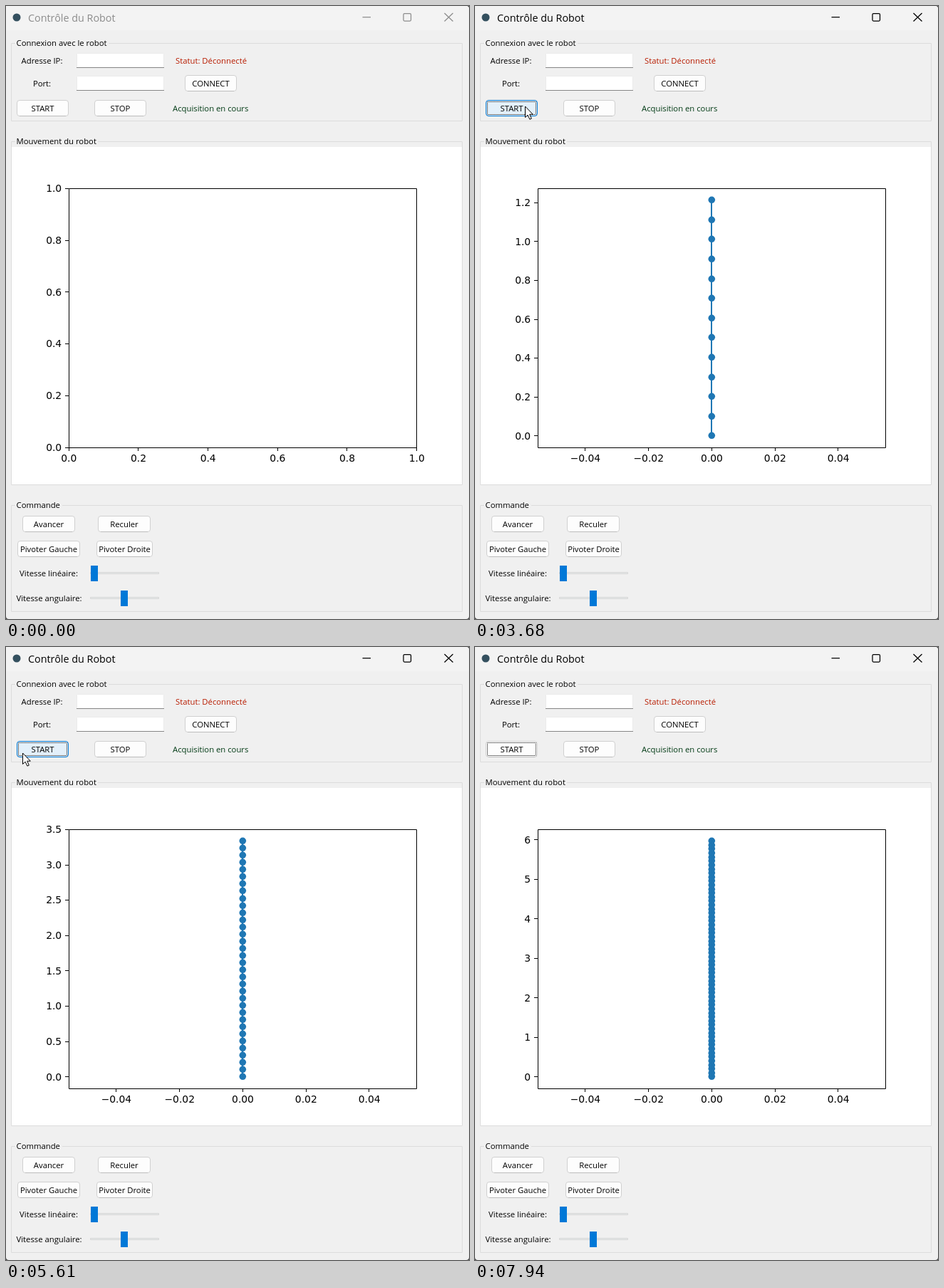
An HTML page with a canvas for the animation above (8 s loop, 650 px wide and 861 px high).

```html
<!DOCTYPE html>
<html lang="fr">
<head>
<meta charset="utf-8">
<title>Contrôle du Robot</title>
<style>
html, body { margin: 0; width: 100%; height: 100%; overflow: hidden; background: #f0f0f0; }
canvas { display: block; }
</style>
</head>
<body>
<canvas id="stage" width="650" height="861"></canvas>
<script>
const ctx = document.getElementById('stage').getContext('2d');
const LOOP = 8000, TICK = 66.5;
const UI = '11.3px "Open Sans", sans-serif';
const PLOT_FONT = '13.89px "DejaVu Sans", sans-serif';
const AX = { left: 88.1, right: 576.5, top: 256.2, bottom: 620.4 };
const STEP = 0.1011; // distance between two robot positions

// [time, index of the newest point]
const progress = [
  [2570, 0], [2960, 4], [3129, 4], [3130, 6], [3540, 11], [3680, 12], [4480, 21],
  [4610, 22], [5350, 31], [5480, 32], [5610, 33], [5750, 35], [5939, 35], [5940, 37],
  [6610, 45], [6750, 46], [6880, 47], [7010, 47], [7540, 55], [7940, 59]
];

function rect(x, y, w, h, fill, stroke, radius = 0) {
  ctx.beginPath();
  ctx.roundRect(x, y, w, h, radius);
  if (fill) { ctx.fillStyle = fill; ctx.fill(); }
  if (stroke) { ctx.strokeStyle = stroke; ctx.stroke(); }
}

function line(color, ...points) {
  ctx.beginPath();
  for (const [x, y] of points) ctx.lineTo(x, y);
  ctx.strokeStyle = color;
  ctx.stroke();
}

function text(str, x, y, { color = '#000', align = 'left', font = UI } = {}) {
  ctx.font = font;
  ctx.textAlign = align;
  ctx.fillStyle = color;
  ctx.fillText(str, x, y);
}

const centered = (str, x, y) => text(str, x, y, { align: 'center' });

function dot(x, y, r, color) {
  ctx.beginPath();
  ctx.arc(x, y, r, 0, 2 * Math.PI);
  ctx.fillStyle = color;
  ctx.fill();
}

function group(label, top, bottom, labelWidth) {
  rect(7.5, top + 0.5, 633, bottom - top, null, '#dcdcdc');
  rect(13, top - 2, labelWidth, 6, '#f0f0f0');
  text(label, 14.5, top + 4);
}

function button(label, x, y, w, fill = '#fdfdfd', border = '#d0d0d0', base = '#bcbcbc') {
  rect(x + 0.5, y + 0.5, w - 1, 22, fill, border, 3.5);
  line(base, [x + 4, y + 22.5], [x + w - 4, y + 22.5]);
  centered(label, x + w / 2, y + 15.5);
}

function entry(y) {
  rect(99.5, y + 0.5, 122, 20, '#fff', '#ebebeb', 1);
  line('#868686', [99, y + 20.5], [222, y + 20.5]);
}

function slider(y, thumbX) {
  rect(118.5, y - 1.5, 96, 2, '#e7eaea', '#d6d6d6');
  rect(thumbX, y - 11, 10, 22, '#0078d7');
}

function titleBar(active) {
  const ink = active ? '#000' : '#8c8c8c';
  rect(0, 0, 650, 34, '#f3f3f3', null, [0, 4, 0, 0]);
  dot(15, 16, 5.5, '#34505f');
  text('Contrôle du Robot', 31, 21.5, { color: ink, font: '14.35px "Open Sans", sans-serif' });
  ctx.lineWidth = 1.25;
  line(ink, [500.5, 15.7], [512, 15.7]);
  rect(558, 10.5, 10.5, 10.5, null, ink, 1.5);
  line(ink, [615.5, 10], [627.5, 21.5]);
  line(ink, [627.5, 10], [615.5, 21.5]);
  ctx.lineWidth = 1;
}

function newestPoint(t) {
  if (t < progress[0][0]) return -1;
  const i = progress.findIndex(p => p[0] > t);
  if (i < 0) return progress.at(-1)[1];
  const [t0, n0] = progress[i - 1], [t1, n1] = progress[i];
  const frames = Math.max(1, Math.round((t1 - t0) / TICK));
  const frame = Math.floor((t - t0) / (t1 - t0) * frames + 1e-6);
  return Math.floor(n0 + (n1 - n0) * frame / frames + 0.4);
}

function niceStep(range) {
  const raw = range / 9, base = 10 ** Math.floor(Math.log10(raw));
  return base * [1, 2, 2.5, 5, 10].find(s => s * base >= raw - 1e-9);
}

function ticks(lo, hi, step, draw) {
  const digits = [0, 1, 2, 3].find(d => Math.abs(step * 10 ** d - Math.round(step * 10 ** d)) < 1e-6);
  for (let i = Math.ceil(lo / step - 1e-6); i * step <= hi + 1e-6; i++)
    draw((i * step - lo) / (hi - lo), (i * step).toFixed(digits).replace('-', '\u2212'));
}

function plot(n) {
  const { left, right, top, bottom } = AX;
  const snap = v => Math.floor(v) + 0.5;
  const max = n * STEP;
  const [xLo, xHi, xStep] = n < 0 ? [0, 1, 0.2] : [-0.055, 0.055, 0.02];
  const [yLo, yHi] = n < 0 ? [0, 1] : n ? [-0.05 * max, 1.05 * max] : [-0.055, 0.055];
  const yStep = n < 0 ? 0.2 : niceStep(yHi - yLo);
  const toY = v => bottom - (v - yLo) / (yHi - yLo) * (bottom - top);

  rect(8, 198, 632, 474, '#fff');
  ticks(xLo, xHi, xStep, (f, label) => {
    const x = left + f * (right - left);
    line('#000', [snap(x), 620], [snap(x), 625]);
    text(label, x + 0.2, 640.3, { align: 'center', font: PLOT_FONT });
  });
  ticks(yLo, yHi, yStep, (f, label) => {
    const y = bottom - f * (bottom - top);
    line('#000', [83, snap(y)], [88, snap(y)]);
    text(label, 78.2, Math.round(y + 4.7), { align: 'right', font: PLOT_FONT });
  });

  if (n >= 0) {
    const x = 332, blue = '#1f77b4';
    ctx.lineWidth = 2;
    line(blue, [x, toY(0)], [x, toY(max)]);
    ctx.lineWidth = 1;
    for (let i = 0; i <= n; i++) dot(x + 0.3, Math.floor(toY(i * STEP)) + 0.3, 4.8, blue);
  }
  rect(snap(left), snap(top), 488, 364, null, '#000');
}

function cursorAt(t) {
  if (t < 450 || t >= 5750) return null;
  if (t < 5480) {
    const u = 1 - Math.min(1, Math.floor((t - 450) / 66) / 5);
    return [70 + 6 * u * u, 141 - 39 * u * u];
  }
  return [[62, 142], [44, 146], [23, 149], [16, 166]][Math.min(3, Math.floor((t - 5480) / 65))];
}

function drawCursor([x, y]) {
  ctx.save();
  ctx.translate(x + 0.5, y);
  const arrow = new Path2D('M0 0V15.5L3.6 12.2 6.4 18.2 8.8 17.1 6.2 11.2H10.8Z');
  ctx.fillStyle = '#fff';
  ctx.fill(arrow);
  ctx.strokeStyle = '#000';
  ctx.stroke(arrow);
  ctx.restore();
}

function startButton(cursor, pressed, focused) {
  const hover = cursor && cursor[1] >= 132 && cursor[1] < 155;
  const colors = pressed ? ['#cce4f7', '#005499', '#005499']
    : hover ? ['#e3f0fa', '#0078d4', '#0078d4'] : [];
  button('START', 15, 132, 73, ...colors);
  if (!focused) return;
  ctx.setLineDash([1, 1]);
  ctx.lineDashOffset = 0.5;
  rect(17.5, 134.5, 68, 18, null, '#000');
  ctx.setLineDash([]);
}

function draw(t) {
  const active = t >= 2300, pressed = active && t < 2430, cursor = cursorAt(t);
  ctx.lineWidth = 1;
  rect(0, 0, 650, 861, '#444');
  rect(0, 0, 650, 861, '#f0f0f0', null, [0, 4, 4, 4]);
  titleBar(active);

  group('Connexion avec le robot', 52, 161, 131);
  centered('Adresse IP:', 50.5, 80.5);
  centered('Port:', 50.5, 113);
  entry(66);
  entry(98);
  text('Statut: Déconnecté', 238, 80.5, { color: '#b81c00' });
  button('CONNECT', 251, 97, 73);
  startButton(cursor, pressed, active);
  button('STOP', 124, 132, 73);
  text('Acquisition en cours', 234, 147.5, { color: '#003a14' });

  group('Mouvement du robot', 190, 672, 116);
  plot(newestPoint(t));

  group('Commande', 701, 850, 66);
  button('Avancer', 23, 716, 74);
  button('Reculer', 129, 716, 74);
  button('Pivoter Gauche', 16, 751, 88);
  button('Pivoter Droite', 127, 751, 79);
  centered('Vitesse linéaire:', 60, 801);
  centered('Vitesse angulaire:', 60.5, 836);
  slider(797, 119);
  slider(832, 161);

  if (pressed) dot(70.5, 141.5, 15.5, 'rgba(240, 240, 60, 0.65)');
  if (cursor) drawCursor(cursor);
}

const began = performance.now();
function loop() {
  draw((performance.now() - began) % LOOP);
  requestAnimationFrame(loop);
}
loop();
</script>
</body>
</html>
```
